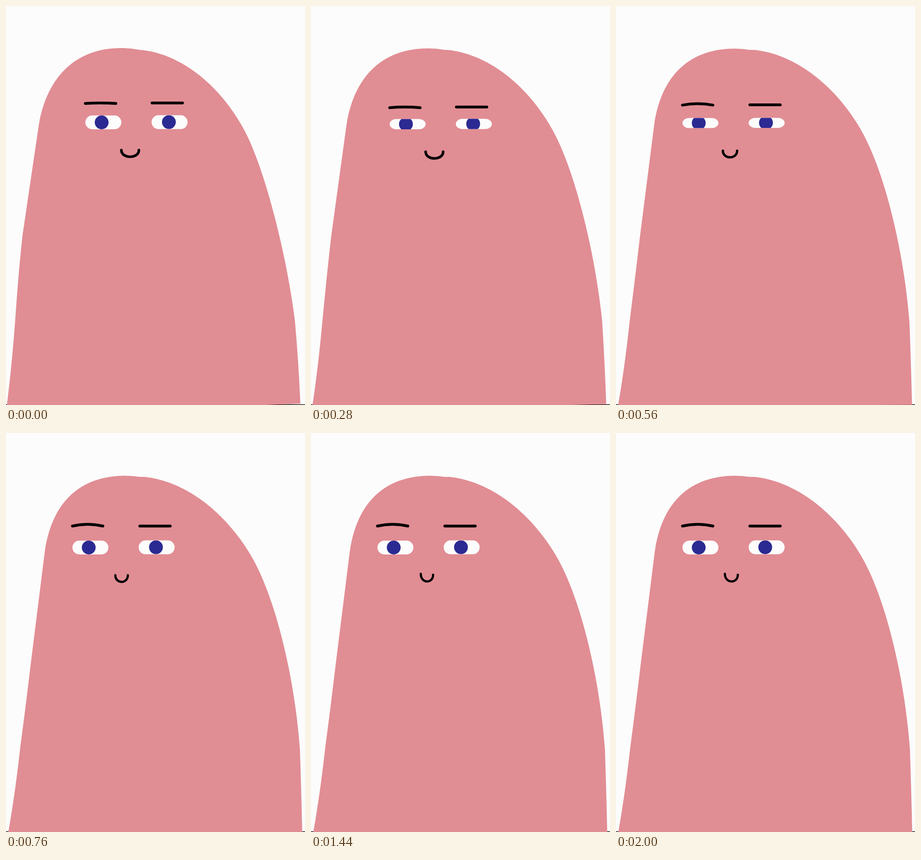
An HTML page for the animation above (3480 ms loop, 648 by 864 pixels).

```html
<!DOCTYPE html>
<html lang="en">
<head>
<meta charset="utf-8">
<title>Blinking blob</title>
<style>
html, body { margin: 0; width: 100%; height: 100%; overflow: hidden; background: #fcfcfc; }
svg { display: block; width: 100%; height: 100%; }
.line { fill: none; stroke: #000; stroke-linecap: round; stroke-width: 6; }
</style>
</head>
<body>
<svg viewBox="0 0 648 864">
  <defs>
    <clipPath id="lidL"><rect id="slitL" width="78"/></clipPath>
    <clipPath id="lidR"><rect id="slitR" width="78"/></clipPath>
  </defs>
  <rect width="648" height="864" fill="#fcfcfc"/>
  <rect y="862.6" width="648" height="1.4" fill="#111"/>
  <path id="body" fill="#e18d94"/>
  <path id="browL" class="line"/>
  <path id="browR" class="line"/>
  <rect id="whiteL" width="78" rx="15" fill="#fcfcfc"/>
  <rect id="whiteR" width="78" rx="15" fill="#fcfcfc"/>
  <circle id="pupilL" r="15" fill="#2b2a92" clip-path="url(#lidL)"/>
  <circle id="pupilR" r="15" fill="#2b2a92" clip-path="url(#lidR)"/>
  <path id="mouth" class="line"/>
</svg>
<script>
const LOOP = 3480, STEP = 40;
const $ = id => document.getElementById(id);
const set = (id, attrs) => {
  for (const k in attrs) $(id).setAttribute(k, attrs[k]);
};
const mix = (a, b, p) => a + (b - a) * p;
const span = (t, a, b) => Math.min(1, Math.max(0, (t - a) / (b - a)));
const smooth = p => p * p * (3 - 2 * p);
const easeOut = p => 1 - (1 - p) * (1 - p);

// Body outline at both ends of its lean
const leanA = [2,864, 13,775, 20,680, 27,575, 36,495, 70,265, 86,155, 150,91, 250,91,
  270,91, 290,95, 300,96, 390,108, 478,185, 526,288, 566,375, 608,540, 626,680,
  634,770, 638,861, 565,864];
const leanB = [5,864, 20,780, 31,680, 43,590, 53,505, 83,265, 97,150, 160,93, 258,92.5,
  274,92.5, 290,95, 300,95, 395,105, 485,180, 538,278, 590,375, 627,545, 637,685,
  640,775, 642,864, 565,864];
const cmds = ['M', 'Q', '', 'Q', '', 'L', 'C', '', '', 'Q', '', 'L', 'C', '', '', 'C', '', '', 'Q', '', 'L'];

function outline(p) {
  const at = i => mix(leanA[i], leanB[i], p).toFixed(2);
  return cmds.map((c, i) => `${c}${at(2 * i)} ${at(2 * i + 1)}`).join(' ') + 'Z';
}

function eye(side, x, cy, h, px, py) {
  const box = { x, y: cy - h / 2, height: h };
  set('white' + side, { ...box, ry: h / 2 });
  set('slit' + side, box);
  set('pupil' + side, { cx: px, cy: py });
}

function draw(t) {
  const close = span(t, 0, 480) ** 2;
  const open = easeOut(span(t, 480, 680));
  const dx = -28 * smooth(span(t, 240, 520));
  const blink = t < 1120 ? smooth(span(t, 960, 1120)) : 1 - smooth(span(t, 1120, 1280));
  const drift = span(t, 1720, 2000);

  set('body', { d: outline(span(t, 0, 620)) });

  const browY = mix(211 + 27 * close, 201.5, open);
  const arch = mix(1 + 1.2 * close, 3.8, open);
  const rightY = mix(210 + 26 * close, 201.5, open);
  const bx = 172 + dx;
  set('browL', { d: `M${bx} ${browY}Q${bx + 33} ${browY - 2 * arch} ${bx + 66} ${browY}` });
  set('browR', { d: `M${mix(316.5, 290, -dx / 28)} ${rightY}h66` });

  const h = mix(30 - 23 * close, 30, open) - 23 * blink;
  const cy = mix(252 + 11.2 * close, 248, open);
  eye('L', 172 + dx, cy, h, 207.3 + dx, cy);
  eye('R', 315.5 + dx, cy - 0.4, h, 353 + dx - 1.6 * drift, cy - 0.6);

  const lift = span(t, 760, 1120), back = span(t, 1120, 2000);
  const x0 = mix(250 + dx, 237, open) + 2 * lift - 3 * back;
  const x1 = mix(288 + dx, 264, open) + lift - back;
  const y = mix(312 + 10.5 * close, 308, open);
  const y0 = y - 3 * lift, y1 = y - lift, dip = y + 19.3 - 0.7 * lift;
  set('mouth', {
    d: `M${x0} ${y0}C${x0} ${dip} ${x1} ${dip} ${x1} ${y1}`,
    'stroke-width': 5.5,
    style: `stroke-width:${mix(5.6, 4.8, open)}`
  });
}

const start = performance.now();
function tick() {
  const t = (performance.now() - start) % LOOP;
  draw(Math.floor(t / STEP) * STEP);
  requestAnimationFrame(tick);
}
tick();
</script>
</body>
</html>
```
